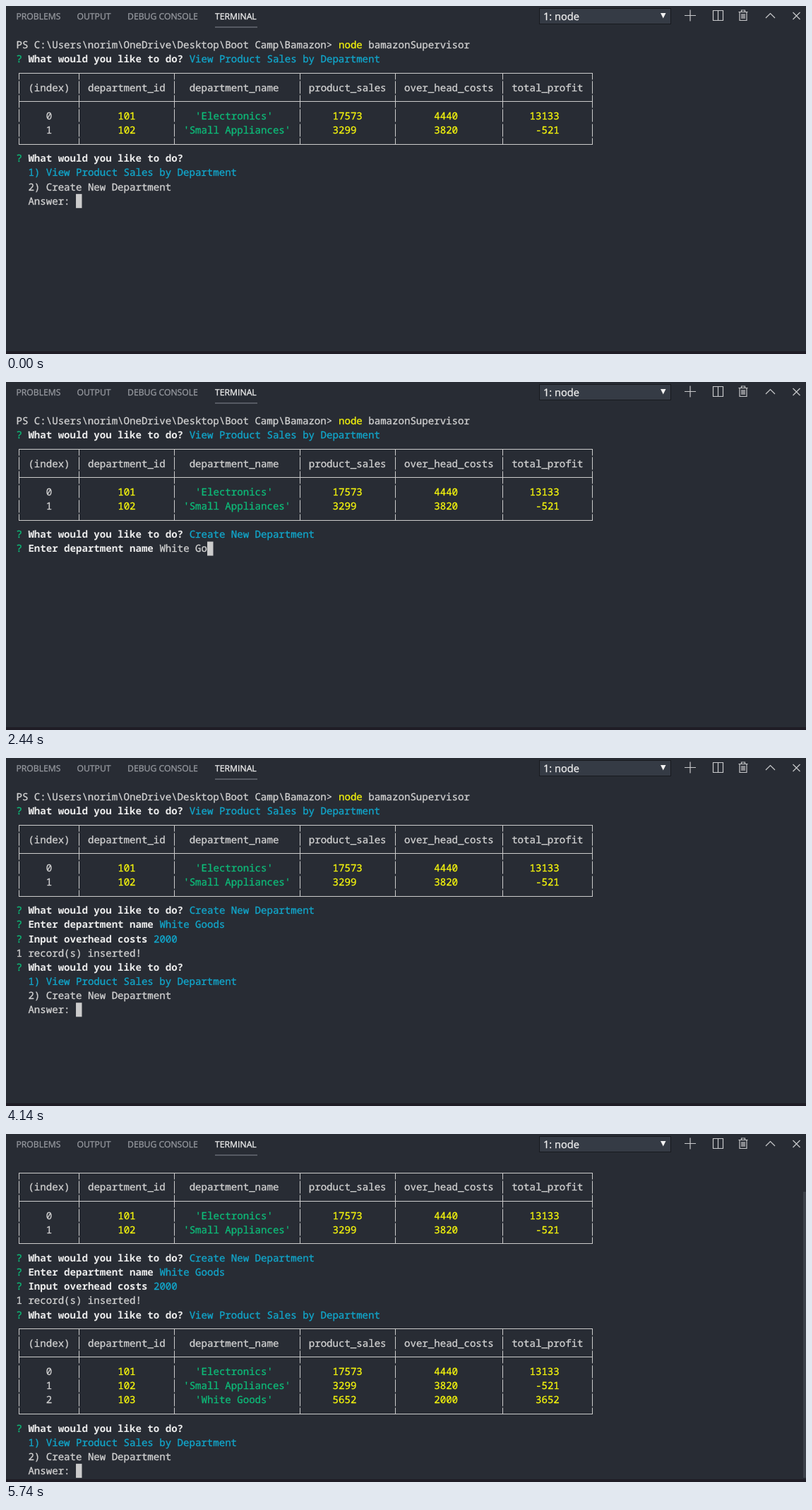
Recreate the animation shown at these times as an HTML page. Size 1133x494 px, loop 9310 ms.

```html
<!DOCTYPE html>
<html lang="en">
<head>
<meta charset="utf-8">
<title>Terminal session</title>
<style>
  html, body { margin: 0; width: 100%; height: 100%; overflow: hidden; background: #282c34; }
  svg { display: block; width: 1133px; height: 494px; }
  text { white-space: pre; text-rendering: geometricPrecision; fill: var(--ink); stroke: var(--ink); stroke-width: .3px; }
  .ui { font: 12.2px "Open Sans", "Noto Sans", sans-serif; --ink: #979aa0; }
  .ui .on { --ink: #f0f0f0; }
  .ui .pick { font-size: 14.6px; --ink: #f2f2f2; }
  .icons { fill: none; stroke: #c8c9cb; stroke-width: 1.2; }
  #term { font: 14.09px "Noto Sans Mono", "DejaVu Sans Mono", monospace; }
  .plain { --ink: #d2d2d2; }
  .bold { --ink: #ececec; font-weight: bold; stroke: none; }
  .cyan { --ink: #11a8cd; }
  .green { --ink: #0dbc79; }
  .yellow { --ink: #f5f50c; }
  .cursor { fill: #cccccc; }
  .grid { fill: none; stroke: #cccccc; }
</style>
</head>
<body>
<svg viewBox="0 0 1133 494">
  <rect width="1133" height="494" fill="#282c34"/>
  <rect y="490" width="1133" height="4" fill="#1f1d26"/>
  <g class="ui">
    <text x="14.5" y="19">PROBLEMS</text>
    <text x="100.5" y="19">OUTPUT</text>
    <text x="172" y="19">DEBUG CONSOLE</text>
    <text class="on" x="296" y="19">TERMINAL</text>
    <path d="M296 30H356" stroke="#858992"/>
    <rect x="755.5" y="3.5" width="186" height="22" fill="#353b45" stroke="#181a1f"/>
    <text class="pick" x="761" y="20">1: node</text>
    <path d="M927 10h7.500l-3.750 7.500z" fill="#f2f2f2"/>
  </g>
  <g class="icons">
    <path d="M961 13.500h16M969 5.500v16"/>
    <path d="M1001.500 6.500h14v14h-14zM1008.500 6.500v14"/>
    <path d="M1037.500 8.500h13M1041.500 8.500v-2.500h5v2.500M1039 8.500v12h10v-12M1042 11v7M1044 11v7M1046 11v7"/>
    <path d="M1076 17l6.500-6.500 6.500 6.500M1114.500 9l10 10m0-10l-10 10"/>
  </g>
  <rect id="bar" x="1129" y="82" width="4" height="406" fill="#3d424b"/>
  <g id="term"></g>
</svg>
<script>
const LOOP = 9310, X0 = 14.5, CW = 8.454, ROW = 20.13, MID = 55.3, ROWS = 22;
const WIDTHS = [9, 15, 20, 15, 17, 14];
const colX = n => X0 + n * CW;
const snap = v => Math.floor(v) + .5;

// Column separators sit in the middle of their character cell
const edges = [0];
WIDTHS.forEach(w => edges.push(edges.at(-1) + w + 1));
const edgeX = edges.map(n => snap(colX(n + .5)));

const plain = s => ['plain', s], cyan = s => ['cyan', s], bold = s => ['bold', s];
const cursor = ['cursor', ' '];
const ask = (label, ...rest) => [['green', '? '], bold(label + ' '), ...rest];

function cells(values, styles) {
  const line = [['bar', ' ']];
  values.forEach((v, i) => {
    const s = String(v), left = Math.floor((WIDTHS[i] - s.length) / 2);
    line.push(plain(' '.repeat(left)), [styles[i], s],
      plain(' '.repeat(WIDTHS[i] - s.length - left + 1)));
  });
  return line;
}

function table(rows) {
  const head = ['(index)', 'department_id', 'department_name',
    'product_sales', 'over_head_costs', 'total_profit'];
  const styles = ['plain', 'yellow', 'green', 'yellow', 'yellow', 'yellow'];
  return [
    [['top']], cells(head, head.map(() => 'plain')), [['cross']],
    ...rows.map((r, i) => cells([i, ...r], styles)), [['bottom']]
  ];
}

const DO = 'What would you like to do?';
const VIEW = 'View Product Sales by Department', CREATE = 'Create New Department';
const stock = [
  [101, "'Electronics'", 17573, 4440, 13133],
  [102, "'Small Appliances'", 3299, 3820, -521]
];
const grown = [...stock, [103, "'White Goods'", 5652, 2000, 3652]];

const menu = (answer, pick) => [
  ask(DO),
  ...[VIEW, CREATE].map((s, i) => [plain('  '), [pick === i + 1 ? 'cyan' : 'plain', `${i + 1}) ${s}`]]),
  [plain('  Answer: ' + answer), cursor]
];

const NAME = 'White Goods', COST = '2000';
const nameKeys = [1750, 1910, 1910, 2050, 2050, ...Array.from({ length: 6 }, (_, i) => 2230 + 86 * i)];
const costKeys = [3300, 3470, 3590, 3760];
const typed = (s, keys, t) => plain(s.slice(0, keys.filter(k => k <= t).length));

function session(t) {
  const out = [
    [plain('PS C:\\Users\\norim\\OneDrive\\Desktop\\Boot Camp\\Bamazon> '),
      ['yellow', 'node'], plain(' bamazonSupervisor')],
    ask(DO, cyan(VIEW)),
    ...table(stock)
  ];
  if (t < 1150) return out.concat(t < 620 ? menu('', 1) : menu('2', 2));
  out.push(ask(DO, cyan(CREATE)));

  const name = 'Enter department name', cost = 'Input overhead costs';
  if (t < 3050) return [...out, ask(name, typed(NAME, nameKeys, t), cursor)];
  out.push(ask(name, cyan(NAME)));
  if (t < 4140) return [...out, ask(cost, typed(COST, costKeys, t), cursor)];
  out.push(ask(cost, cyan(COST)), [plain('1 record(s) inserted!')]);

  if (t < 5580) return out.concat(menu(t < 5270 ? '' : '1', 1));
  if (t < 5740) return [...out, [cursor]];
  return [...out, ask(DO, cyan(VIEW)), ...table(grown), ...menu('', 1)];
}

function gridRow(kind, row) {
  const y = snap(MID + row * ROW);
  const from = kind === 'top' ? y : y - 9, to = kind === 'bottom' ? y : y + 9;
  const bars = edgeX.map(x => `M${x} ${from}V${to}`).join('');
  const rule = kind === 'bar' ? '' : `M${edgeX[0] - .5} ${y}H${edgeX.at(-1) + .5}`;
  return `<path class="grid" d="${bars}${rule}"/>`;
}

function drawLine(line, row) {
  let col = 0;
  return line.map(([kind, s = '']) => {
    const x = colX(col);
    col += s.length;
    if (kind === 'cursor')
      return `<rect class="cursor" x="${x}" y="${MID + row * ROW - 9.9}" width="${CW}" height="20"/>`;
    if (['bar', 'top', 'cross', 'bottom'].includes(kind)) return gridRow(kind, row);
    return s.trim() && `<text class="${kind}" x="${x}" y="${60.2 + row * ROW}">${s.replace(/>/g, '&gt;')}</text>`;
  }).join('');
}

const term = document.getElementById('term'), bar = document.getElementById('bar');
let shown = '';

function frame() {
  const lines = session(performance.now() % LOOP);
  const html = lines.slice(-ROWS).map(drawLine).join('');
  if (html !== shown) {
    term.innerHTML = shown = html;
    bar.style.display = lines.length > ROWS ? '' : 'none';
  }
  requestAnimationFrame(frame);
}
frame();
</script>
</body>
</html>
```
